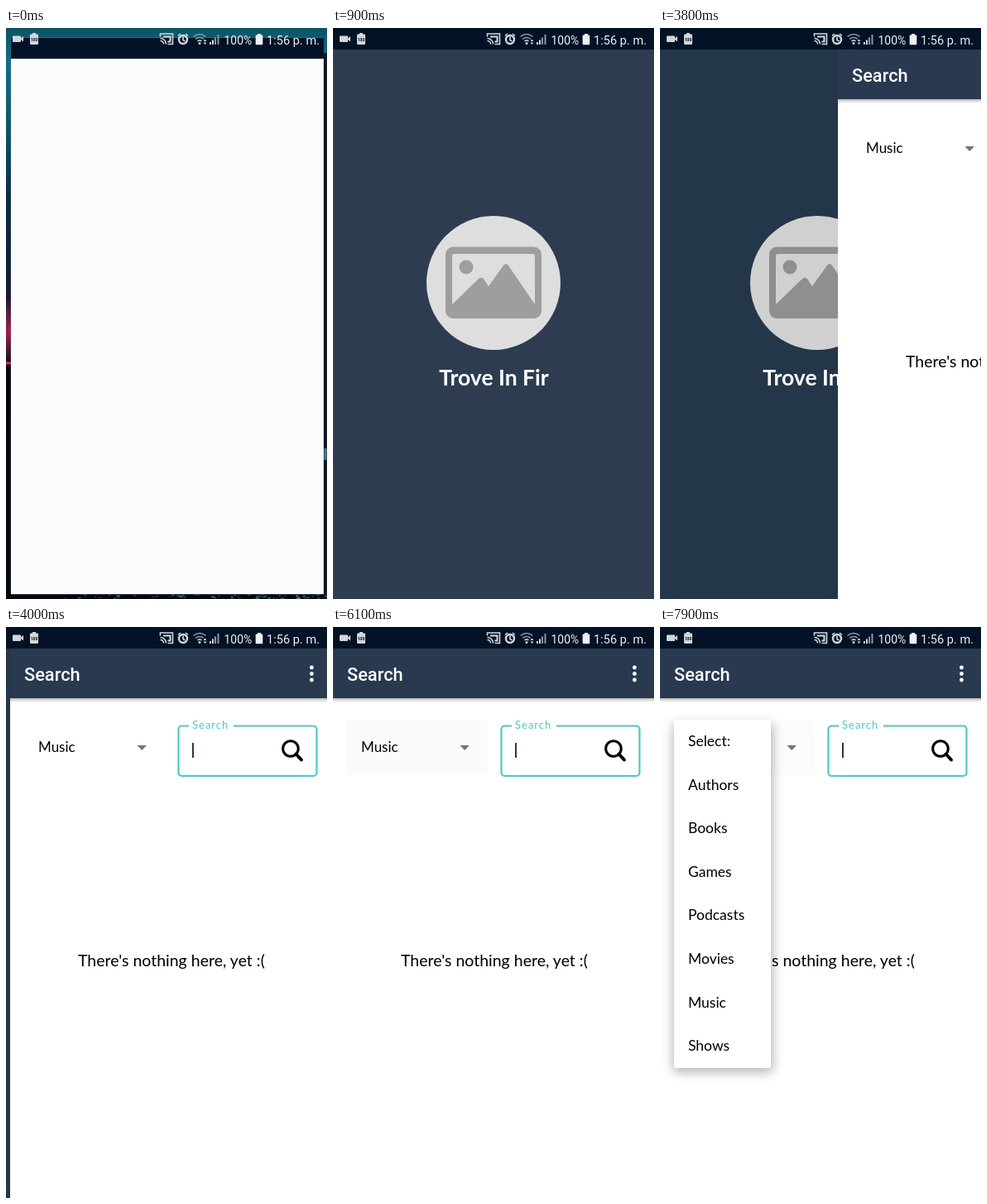
Write an HTML page that moves like this. It is 388 by 690 pixels and loops after 8 s.

```html
<!DOCTYPE html>
<html lang="en">
<head>
<meta charset="utf-8">
<title>Search app</title>
<style>
  html, body { margin: 0; width: 100%; height: 100%; overflow: hidden; background: #000; }
  svg { display: block; width: 388px; height: 690px; }
  text { font-family: Lato, sans-serif; white-space: pre; }
  .sys { font-family: Roboto, sans-serif; }
</style>
</head>
<body>
<svg viewBox="0 0 388 690" xmlns="http://www.w3.org/2000/svg">
  <defs>
    <linearGradient id="wall" x2="0" y2="1">
      <stop offset="0" stop-color="#0b5466"/>
      <stop offset=".06" stop-color="#0a7188"/>
      <stop offset=".16" stop-color="#0a5a72"/>
      <stop offset=".3" stop-color="#082c42"/>
      <stop offset=".47" stop-color="#141a35"/>
      <stop offset=".53" stop-color="#a02048"/>
      <stop offset=".57" stop-color="#401530"/>
      <stop offset=".6" stop-color="#03060c"/>
      <stop offset="1" stop-color="#05090f"/>
    </linearGradient>
    <linearGradient id="drop" x2="0" y2="1">
      <stop offset="0" stop-color="#000" stop-opacity=".28"/>
      <stop offset="1" stop-color="#000" stop-opacity="0"/>
    </linearGradient>
    <filter id="soft" x="-30%" y="-10%" width="160%" height="120%"><feGaussianBlur stdDeviation="7"/></filter>
    <clipPath id="reveal"><rect id="revealBox" x="-20" y="80" width="200" height="500"/></clipPath>
  </defs>

  <g id="home">
    <rect width="388" height="690" fill="url(#wall)"/>
    <rect x="384" y="30" width="4" height="660" fill="#0a1a2a"/>
    <path d="M0 405h6" stroke="#d02a50" stroke-width="3"/>
    <path d="M386 508v14" stroke="#3f8794" stroke-width="3"/>
    <g id="specks" fill="#4a8fa0"></g>
  </g>

  <g id="win">
    <g id="splash">
      <rect id="back" width="388" height="690"/>
      <g id="art">
        <circle id="disc" cx="194" cy="308" r="81"/>
        <g id="pic">
          <path fill-rule="evenodd" d="M145 264.500h98a9 9 0 0 1 9 9v68.500a9 9 0 0 1-9 9h-98a9 9 0 0 1-9-9v-68.500a9 9 0 0 1 9-9zM147 273a3 3 0 0 0-3 3v58l32-31q3-3 6 0l6 9 18-25q3-4 6 0l32 47v-58a3 3 0 0 0-3-3z"/>
          <circle cx="161" cy="289" r="8.500"/>
        </g>
        <text x="194.500" y="432" font-size="26.500" font-weight="700" fill="#fff" text-anchor="middle">Trove In Fir</text>
      </g>
      <rect id="veil" width="388" height="690" fill="#fafbfd"/>
    </g>
    <rect width="388" height="26" fill="#031226"/>
  </g>

  <g id="page">
    <rect y="26" width="388" height="664" fill="#fff"/>
    <rect y="86" width="388" height="5" fill="url(#drop)"/>
    <rect y="26" width="388" height="60" fill="#283950"/>
    <text class="sys" x="17" y="64.500" font-size="21.800" font-weight="500" fill="#fff">Search</text>
    <g fill="#fff"><circle cx="364.500" cy="49" r="2.400"/><circle cx="364.500" cy="56.500" r="2.400"/><circle cx="364.500" cy="64" r="2.400"/></g>

    <rect id="press" x="17" y="112" width="170" height="67" fill="#fafafa"/>
    <text x="34" y="151" font-size="17">Music</text>
    <path d="M153.500 143h11.500l-5.750 6z" fill="#757575"/>

    <path d="M216 119.500h-8.500a4 4 0 0 0-4 4v52.500a4 4 0 0 0 4 4h159a4 4 0 0 0 4-4v-52.500a4 4 0 0 0-4-4H270" fill="none" stroke="#4dc8c2" stroke-width="2.200"/>
    <text x="220" y="123" font-size="13" letter-spacing="1" fill="#4dc8c2">Search</text>
    <rect id="caret" x="220" y="140" width="2" height="18" fill="#283950"/>
    <g fill="none" stroke="#000"><circle cx="339" cy="147" r="9.300" stroke-width="3"/><path d="M345.500 153.500l6.500 7" stroke-width="4" stroke-linecap="round"/></g>

    <text x="82" y="410" font-size="19.500">There's nothing here, yet :(</text>

    <g id="menu" clip-path="url(#reveal)">
      <rect id="shade" x="16" y="117" width="120" height="421" rx="4" fill="#000" opacity=".3" filter="url(#soft)"/>
      <rect id="card" x="17" y="112" width="117" height="421" rx="3" fill="#fff"/>
      <g id="items" font-size="17.500"></g>
    </g>
  </g>

  <g fill="#d3d7da">
    <path d="M9 9.500h8q1 0 1 1v2l3-2.500v6.500l-3-2.500v2q0 1-1 1h-8q-1 0-1-1v-5.500q0-1 1-1z"/>
    <path d="M32 6h4v1.500h2q1 0 1 1v10.500q0 1-1 1h-8q-1 0-1-1v-10.500q0-1 1-1h2z"/>
    <text class="sys" x="34" y="16" font-size="5" font-weight="700" fill="#031226" text-anchor="middle">100</text>
    <g fill="none" stroke="#d3d7da" stroke-width="1.600">
      <path d="M186.500 10.500v-3.500h15v12.500h-6M186.500 12.500a7 7 0 0 1 7 7M186.500 15.500a4 4 0 0 1 4 4"/>
      <path d="M190 10.500h8.500v6h-3" stroke-width="2"/>
      <circle cx="214" cy="14" r="5" stroke-width="2.400"/>
      <path d="M214 10.500v4l2.500 1.500M208 9.500l3-2.500M220 9.500l-3-2.500"/>
      <path d="M226.500 10.500q7.500-6 15 0M229 13.500q5-4 10 0" stroke="#8b959e"/>
      <path d="M231.500 16q2.500-2 5 0"/>
    </g>
    <circle cx="234" cy="18.500" r="1.500"/>
    <path d="M238.500 16l2-2.500 2 2.500zM238.500 17.500h4l-2 2.500z"/>
    <path d="M246 17h2v3h-2zM249 14.500h2v5.500h-2z"/>
    <path d="M252 11.500h2v8.500h-2zM255.500 8h2v12h-2z" fill="#8b959e"/>
    <path d="M304 7h4v1.500h1.500q.8 0 .8.800v10.200q0 .8-.8.800h-7q-.8 0-.8-.8v-10.200q0-.8.800-.8h1.500z" fill="#eef0f2"/>
    <text class="sys" x="263.500" y="19.500" font-size="14" fill="#eef0f2">100%</text>
    <text class="sys" x="315" y="19.500" font-size="14.600" fill="#eef0f2">1:56 p. m.</text>
  </g>
</svg>
<script>
  const LOOP = 8000;
  const $ = id => document.getElementById(id);
  const set = (id, name, value) => $(id).setAttribute(name, value);
  const ramp = (t, a, b) => Math.min(1, Math.max(0, (t - a) / (b - a)));
  const easeOut = p => 1 - (1 - p) ** 3;
  const mix = (a, b, p) => `rgb(${a.map((v, i) => Math.round(v + (b[i] - v) * p))})`;
  const show = (id, on) => set(id, 'display', on ? 'inline' : 'none');

  function add(parent, tag, attrs, text = '') {
    const el = document.createElementNS('http://www.w3.org/2000/svg', tag);
    for (const name in attrs) el.setAttribute(name, attrs[name]);
    el.textContent = text;
    $(parent).append(el);
  }

  // Piecewise linear path through [time, value] points
  function track(points, t) {
    let value = points[0][1];
    for (let i = 1; i < points.length; i++) {
      const [a, from] = points[i - 1], [b, to] = points[i];
      if (t >= a) value = from + (to - from) * ramp(t, a, b);
    }
    return value;
  }

  const slide = [[3640, 388], [3700, 349], [3800, 216], [3900, 66], [4000, 5], [4100, 0]];

  ['Select:', 'Authors', 'Books', 'Games', 'Podcasts', 'Movies', 'Music', 'Shows'].forEach((name, i) =>
    add('items', 'text', { x: 34, y: 144 + 52.6 * i }, name));

  // City lights along the lower edge of the wallpaper
  let seed = 7;
  const rand = () => (seed = seed * 16807 % 2147483647) / 2147483647;
  for (let i = 0; i < 70; i++) {
    add('specks', 'rect', {
      x: 70 + 318 * rand(), y: 684 + 5 * rand(), width: 1 + 4 * rand(), height: 1.5, opacity: 0.2 + 0.6 * rand()
    });
  }

  function draw(t) {
    const open = easeOut(ramp(t, 0, 200));
    const scale = 0.974 + 0.026 * open;
    set('win', 'transform', `translate(${6 * (1 - open)} ${12 * (1 - open)}) scale(${scale})`);
    show('home', t < 220);
    set('veil', 'opacity', 1 - ramp(t, 200, 850));

    const dim = ramp(t, 2500, 3700);
    set('back', 'fill', mix([45, 60, 80], [36, 54, 74], dim));
    set('disc', 'fill', mix([222, 222, 222], [208, 208, 208], dim));
    set('pic', 'fill', mix([158, 158, 158], [143, 143, 143], dim));

    const x = track(slide, t);
    set('art', 'transform', `translate(${-9 * (1 - x / 388)} 0)`);
    set('page', 'transform', `translate(${Math.round(x)} 0)`);
    show('page', x < 388);

    show('caret', t < 4600 || (t >= 5100 && t < 5600) || t >= 6100);
    set('press', 'opacity', ramp(t, 5600, 5900) * (1 - 0.5 * ramp(t, 6400, 7000)));

    const drop = easeOut(ramp(t, 6150, 6400));
    show('menu', drop > 0);
    set('menu', 'opacity', drop);
    const tall = 421 * (0.4 + 0.6 * drop);
    set('card', 'height', tall);
    set('shade', 'height', tall);
    set('revealBox', 'height', tall + 32 + 40 * drop);
  }

  function tick(now) {
    draw(now % LOOP);
    requestAnimationFrame(tick);
  }
  draw(0);
  requestAnimationFrame(tick);
</script>
</body>
</html>
```
